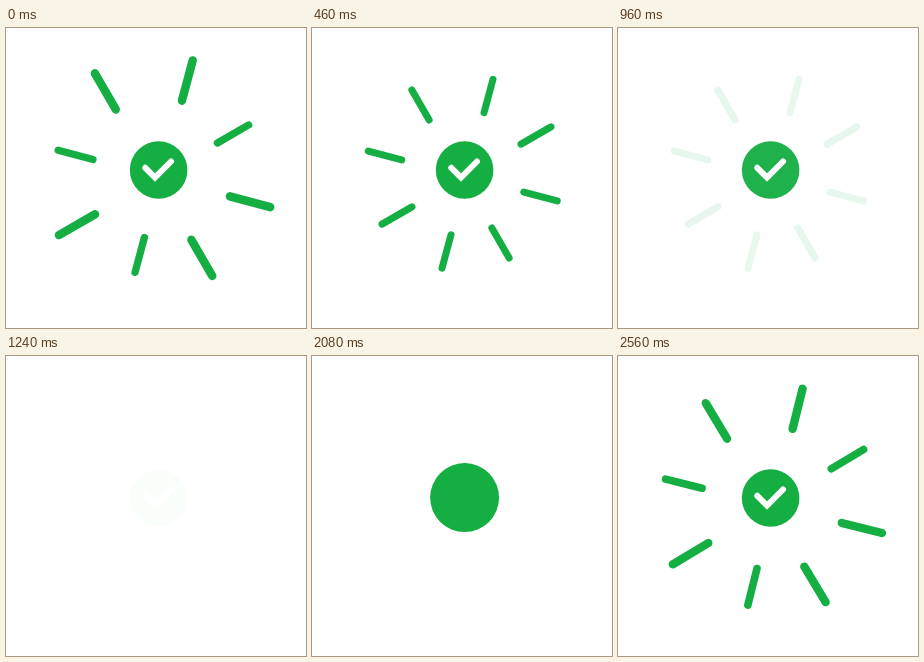
An HTML page with a canvas for the animation above (2600 ms loop, 300 by 300 pixels).

```html
<!DOCTYPE html>
<html lang="en">
<head>
<meta charset="utf-8">
<title>Success burst</title>
<style>
  html, body { margin: 0; width: 100%; height: 100%; overflow: hidden; background: #fff; }
  canvas { display: block; width: 100%; height: 100%; }
</style>
</head>
<body>
<canvas id="stage" width="300" height="300"></canvas>
<script>
const ctx = document.getElementById('stage').getContext('2d');
const LOOP = 2600;
const GREEN = '#14ae43';
const CENTER = [153, 143];

// Ray midpoints at rest, clockwise; each ray points 45 degrees further on.
const RAYS = [
  [228.5, 168.5], [188.5, 215], [134.5, 223.5], [85, 187.5],
  [73, 127.5], [108.5, 77], [176.5, 68], [224, 107.5]
];
const EARLY = [2, 4, 7];
const HALF_RAY = 17.3;

const progress = (t, start, length) => Math.min(1, Math.max(0, (t - start) / length));
const smooth = p => (1 - Math.cos(Math.PI * p)) / 2;

// Grows from 0 to peak in 200 ms, then settles to 1 in 240 ms.
function pop(t, start, peak) {
  const rise = peak * Math.sin(progress(t, start, 200) * Math.PI / 2);
  return rise - (peak - 1) * smooth(progress(t, start + 200, 240));
}

function drawRays(t, fade) {
  const wobble = -11 * Math.sin(progress(t, 2290, 300) * Math.PI) ** 2;
  ctx.strokeStyle = GREEN;
  ctx.lineWidth = 7;
  ctx.lineCap = 'round';
  RAYS.forEach(([x, y], i) => {
    const early = EARLY.includes(i);
    const start = early ? 2240 : 2380;
    if (t <= start) return;
    const scale = pop(t, start, early ? 1.175 : 1.21);
    ctx.save();
    ctx.globalAlpha = progress(t, start, 160) ** 2 * fade;
    ctx.translate(...CENTER);
    ctx.rotate(wobble * Math.PI / 180);
    ctx.scale(scale, scale);
    ctx.translate(x - CENTER[0], y - CENTER[1]);
    ctx.rotate((15 + 45 * i) * Math.PI / 180);
    ctx.beginPath();
    ctx.moveTo(-HALF_RAY, 0);
    ctx.lineTo(HALF_RAY, 0);
    ctx.stroke();
    ctx.restore();
  });
}

function drawBadge(t, fade) {
  const scale = pop(t, 1864, 1.2);
  ctx.save();
  ctx.globalAlpha = progress(t, 1864, 110) * fade;
  ctx.fillStyle = GREEN;
  ctx.beginPath();
  ctx.arc(152.6, 144 - 2 * scale, 28.8 * scale, 0, Math.PI * 2);
  ctx.fill();

  const drawn = progress(t, 2260, 220);
  if (drawn > 0) {
    ctx.globalAlpha = 1;
    ctx.strokeStyle = '#fff';
    ctx.lineWidth = 6;
    ctx.setLineDash([36.4 * drawn, 100]);
    ctx.beginPath();
    ctx.moveTo(139.3, 139.8);
    ctx.lineTo(149, 149.5);
    ctx.lineTo(165, 133.5);
    ctx.stroke();
  }
  ctx.restore();
}

function frame(now) {
  const t = now % LOOP;
  const leaving = t < 1870;
  const entered = leaving ? t + LOOP : t;
  const rayFade = leaving ? 1 - smooth(progress(t, 540, 525)) : 1;
  const badgeFade = leaving ? Math.max(0.02, 1 - smooth(progress(t, 910, 350))) : 1;
  ctx.clearRect(0, 0, 300, 300);
  drawRays(entered, rayFade);
  drawBadge(entered, badgeFade);
  requestAnimationFrame(frame);
}
requestAnimationFrame(frame);
</script>
</body>
</html>
```
